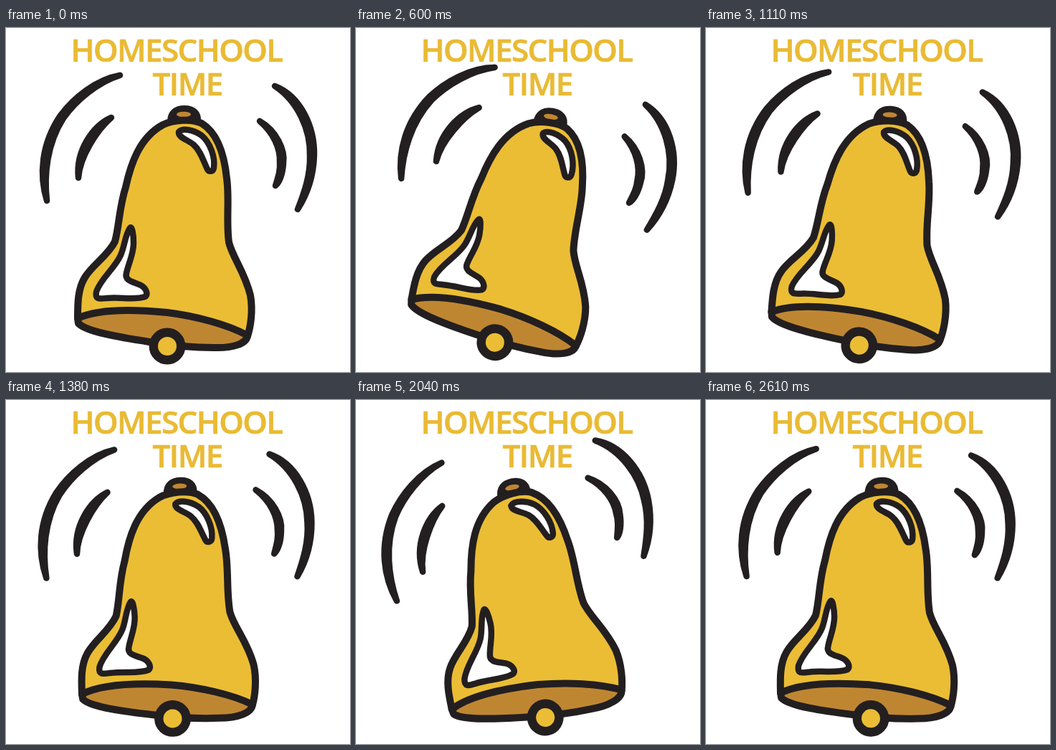
An HTML page that plays this animation: 480 by 480 pixels, repeating every 2640 ms.

```html
<!DOCTYPE html>
<html lang="en">
<head>
<meta charset="utf-8">
<title>Ringing bell</title>
<style>
  html, body { margin: 0; width: 100%; height: 100%; overflow: hidden; background: #fff; }
  svg { display: block; width: 100%; height: 100%; }
  text { font: 600 44px "Open Sans", "Noto Sans", sans-serif; letter-spacing: -1.6px; fill: #e9ba34; stroke: #e9ba34; stroke-width: .7; }
  #bell { stroke: #231f20; stroke-width: 10; stroke-linecap: round; stroke-linejoin: round; }
  .gold { fill: #ebbd35; }
  .brown { fill: #bf8632; }
  .ink { fill: #231f20; }
  .waves { stroke-width: 8.5; }
  .shine { fill: #fff; stroke-width: 8.5; }
</style>
</head>
<body>
<svg viewBox="0 0 480 480">
  <g id="bell">
    <g class="waves ink">
      <path d="M159 66C125 72 94 98 76 122C49 162 46 205 57 241C53 205 57 162 80 126C97 102 127 76 159 66Z"/>
      <path d="M147 125C122 136 97 170 101 209C103 180 127 142 147 125Z"/>
      <path d="M375 81C411 95 431 138 430 178C429 210 418 236 407 253C416 230 425 205 424 178C425 142 407 102 375 81Z"/>
      <path d="M354 130C377 143 390 170 387 189C386 205 381 216 376 220C380 207 383 198 382 187C383 168 373 146 354 130Z"/>
    </g>
    <path class="ink" d="M230 131C230 118 238 113 249 113C261 113 268 119 267 130Z"/>
    <ellipse class="brown" cx="248" cy="120.5" rx="10" ry="3.8" stroke="none"/>
    <path class="gold" d="M100 405C100 385 100 364 110 348C121 330 142 318 152 298C158 276 158 250 167 222C174 190 186 153 219 135C234 128 259 126 273 133C296 147 305 180 308 210C312 238 307 270 311 299C316 320 333 340 341 373C345 395 341 418 337 430"/>
    <path class="brown" d="M100 405C130 391 185 393 225 397C265 402 310 414 337 429C336 441 315 447 290 446C255 446 230 443 200 438C160 432 112 424 101 412Z"/>
    <circle class="gold" cx="225" cy="444" r="19.2" stroke-width="12.4"/>
    <g class="shine">
      <path d="M241 145C246 139 262 142 273 150C285 160 292 180 290 195C289 201 283 201 281 197C275 185 272 172 262 163C254 156 240 153 241 145Z"/>
      <path d="M173 279C166 289 166 303 160 317C152 335 132 350 126 368C124 379 130 378 140 377C160 375 180 380 194 375C200 371 194 361 186 358C176 354 165 352 168 342C171 328 178 316 178 300C178 289 176 275 173 279Z"/>
    </g>
  </g>
  <text x="90.5" y="47">HOMESCHOOL</text>
  <text x="204.5" y="93.5">TIME</text>
</svg>
<script>
  const LOOP = 2640, STEP = 30;
  // Swing turning points: [time in ms, angle in degrees]
  const swing = [[0, 0], [724, 11.9], [1931, -14.3], [LOOP, -1]];
  const bell = document.getElementById("bell");

  function angleAt(t) {
    const i = swing.findIndex(([time]) => time > t);
    const [t0, a0] = swing[i - 1], [t1, a1] = swing[i];
    return a0 + (a1 - a0) * (t - t0) / (t1 - t0);
  }

  function draw() {
    const t = Math.floor(performance.now() % LOOP / STEP) * STEP;
    bell.setAttribute("transform", `rotate(${angleAt(t)} 240 261)`);
    requestAnimationFrame(draw);
  }
  draw();
</script>
</body>
</html>
```
